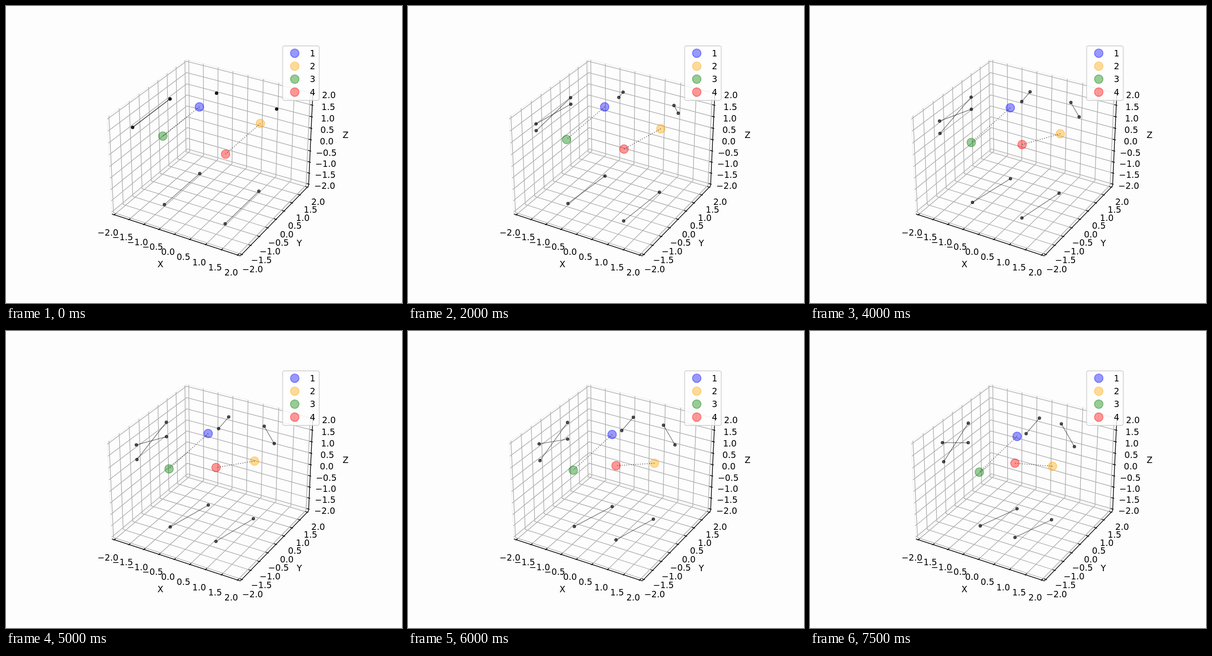
Recreate the animation shown at these times as an HTML page with a canvas. Size 864 by 648 pixels, loop 8 s.

```html
<!DOCTYPE html>
<html lang="en">
<head>
<meta charset="utf-8">
<title>Four points in 3D</title>
<style>
  html, body { margin: 0; width: 100%; height: 100%; overflow: hidden; background: #fdfdfd; }
  canvas { display: block; }
</style>
</head>
<body>
<canvas id="stage" width="864" height="648"></canvas>
<script>
const ctx = document.getElementById('stage').getContext('2d');
const LOOP = 8000, STEP = 500;
const E = 2 + 1 / 12; // distance of the walls from the centre
const TICKS = Array.from({ length: 9 }, (_, i) => i / 2 - 2);
const COLORS = ['rgba(0,0,255,.4)', 'rgba(255,165,0,.4)', 'rgba(0,128,0,.4)', 'rgba(255,0,0,.4)'];
const SHADOW = 'rgba(0,0,0,.6)';

// Perspective view: azimuth -60°, elevation 30°, distance 10, box 4:4:3
function project([x, y, z]) {
  const k = 1.82946407 / Math.hypot(4, 4, 3);
  const s = Math.sqrt(3) / 2;
  x *= k; y *= k; z *= k * 0.75;
  const right = s * x + y / 2;
  const up = -x / 4 + s / 2 * y + s * z;
  const depth = 10 - (s / 2 * x - 0.75 * y + z / 2);
  const scale = 2697.08 / depth;
  return [449.54 + right * scale, 320.5 - up * scale];
}

function line(points, color, width, dash = []) {
  ctx.beginPath();
  points.forEach(p => ctx.lineTo(...project(p)));
  ctx.strokeStyle = color;
  ctx.lineWidth = width;
  ctx.setLineDash(dash);
  ctx.stroke();
  ctx.setLineDash([]);
}

function dot([x, y], r, color) {
  ctx.beginPath();
  ctx.arc(x, y, r, 0, 2 * Math.PI);
  ctx.fillStyle = ctx.strokeStyle = color;
  ctx.lineWidth = 1.875;
  ctx.fill();
  ctx.stroke();
}

function text(str, x, y) {
  ctx.fillStyle = '#000';
  ctx.fillText(str, x, y + 6.8);
}

function drawAxes() {
  line([[-E, -E, E], [-E, -E, -E], [-E, E, -E], [-E, E, E], [-E, -E, E]], '#f3f3f3', 1.8);
  line([[-E, E, E], [E, E, E], [E, E, -E], [-E, E, -E]], '#f3f3f3', 1.8);
  for (const t of TICKS) {
    line([[t, -E, -E], [t, E, -E], [t, E, E]], '#b0b0b0', 1.5);
    line([[E, t, -E], [-E, t, -E], [-E, t, E]], '#b0b0b0', 1.5);
    line([[-E, -E, t], [-E, E, t], [E, E, t]], '#b0b0b0', 1.5);
  }
  line([[-E, -E, -E], [E, -E, -E]], '#000', 1.5);
  line([[E, -E, -E], [E, E, -E]], '#000', 1.5);
  line([[E, E, -E], [E, E, E]], '#000', 1.5);

  const out = E + 1 / 30, inn = E - 1 / 15;
  for (const t of TICKS) {
    line([[t, -out, -E], [t, -inn, -E]], '#000', 1.5);
    line([[out, t, -E], [inn, t, -E]], '#000', 1.5);
    line([[out, E, t], [inn, E, t]], '#000', 1.5);
    const label = t.toFixed(1).replace('-', '\u2212');
    const put = (p, dx, dy) => {
      const [x, y] = project(p);
      text(label, x + dx, y + dy);
    };
    put([t, -E, -E], -14, 38.3);
    put([E, t, -E], 23.5, 32.3);
    put([E, E, t], 35, 3.5);
  }
  text('X', 337, 563.5);
  text('Y', 640, 517);
  text('Z', 741, 281);
}

function drawLegend() {
  ctx.beginPath();
  ctx.roundRect(603.5, 87, 80, 119, 4);
  ctx.fillStyle = 'rgba(255,255,255,.8)';
  ctx.strokeStyle = 'rgba(204,204,204,.8)';
  ctx.lineWidth = 1.875;
  ctx.fill();
  ctx.stroke();
  COLORS.forEach((color, i) => {
    const y = 103 + i * 28.3;
    dot([630, y], 9.375, color);
    text(i + 1, 669, y);
  });
}

// Points 4 and 3 mirror points 1 and 2 about the vertical axis
function positions(t) {
  const a = [
    -1 + t * (0.0735 + 0.0021 * t - 0.00008 * t * t),
    1 - t * (0.0368 + 0.0006 * t),
    1 + t * (0.0582 - 0.00382 * t)];
  const b = [
    1 - t * t * (0.0016 + 0.00024 * t),
    1 - t * (0.0325 + 0.0017 * t),
    1 - t * (0.0978 - 0.002 * t)];
  const mirror = ([x, y, z]) => [-x, -y, z];
  return [a, b, mirror(b), mirror(a)];
}

function drawPoints(t) {
  const pts = positions(t);
  const pairs = [[pts[0], pts[2]], [pts[1], pts[3]]];
  [-2, 2, -2].forEach((wall, axis) => {
    for (const pair of pairs) {
      const flat = pair.map(p => p.map((v, i) => i === axis ? wall : v));
      line(flat, 'rgba(0,0,0,.5)', 1.5);
      flat.forEach(p => dot(project(p), 2.8, SHADOW));
    }
  });
  pts.forEach((p, i) => dot(project(p), 9.375, COLORS[i]));
  pairs.forEach(pair => line(pair, SHADOW, 1.6, [1.875, 3.1]));
}

function frame(now) {
  ctx.fillStyle = '#fdfdfd';
  ctx.fillRect(0, 0, 864, 648);
  ctx.font = '18.75px "DejaVu Sans", sans-serif';
  ctx.textAlign = 'center';
  drawAxes();
  drawPoints(Math.floor(now % LOOP / STEP) * STEP / 1000);
  drawLegend();
  requestAnimationFrame(() => frame(performance.now() - start));
}

const start = performance.now();
frame(0);
</script>
</body>
</html>
```
